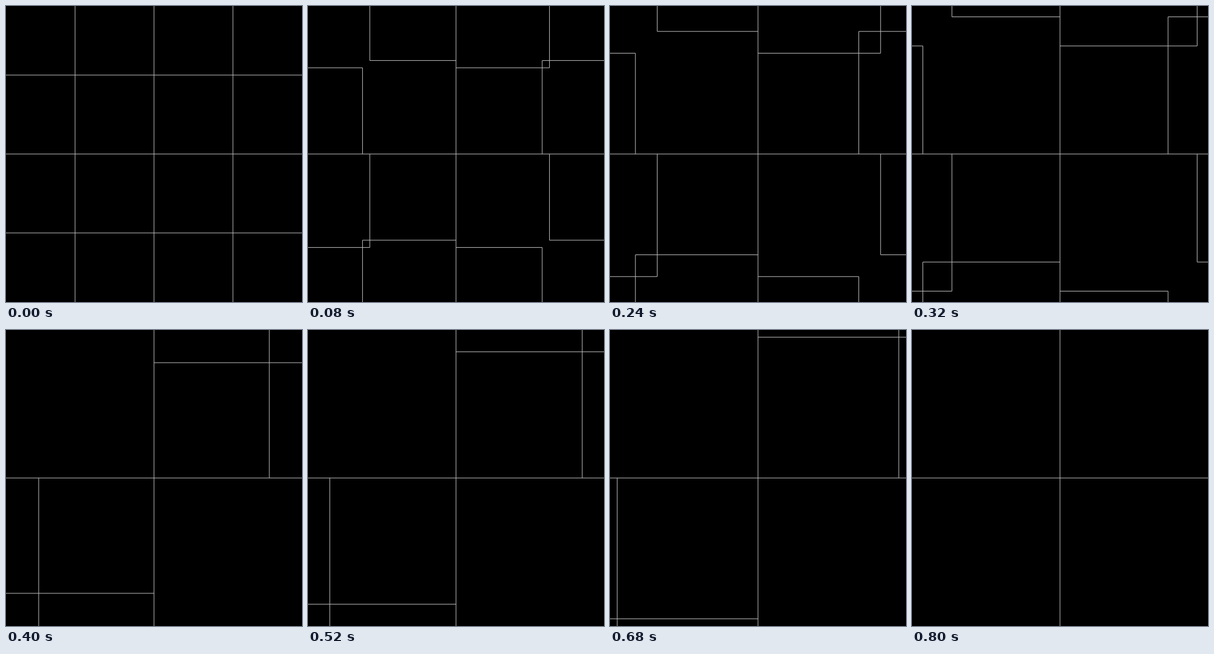
Animation of 480 by 480 pixels, one loop 960 ms. Source, as an HTML page without scripts:

```html
<!DOCTYPE html>
<html lang="en">
<head>
<meta charset="utf-8">
<title>Parting grid</title>
<style>
  @property --shift {
    syntax: "<number>";
    inherits: true;
    initial-value: 0;
  }

  html, body {
    margin: 0;
    height: 100%;
    overflow: hidden;
    background: #000;
  }

  .stage {
    display: block;
    width: 100%;
    height: 100%;
    fill: none;
    stroke: #bbb;
    animation: part 960ms infinite;
  }

  /* Each corner slides along both axes, one twice as fast as the other. */
  .corner {
    transform: translate(
      calc(var(--x) * var(--shift) * 1px),
      calc(var(--y) * var(--shift) * 1px));
  }

  @keyframes part {
    0% { --shift: 0; animation-timing-function: steps(20); }
    83.3%, 100% { --shift: 118; }
  }
</style>
</head>
<body>
<svg class="stage" viewBox="0 0 480 480">
  <defs>
    <g id="half">
      <svg width="240" height="240" viewBox="0 0 240 240">
        <path class="corner" style="--x:-1; --y:-2" d="M112 -400V112H640"/>
        <path class="corner" style="--x:-2; --y:-1" d="M-400 112H112V640"/>
      </svg>
      <svg x="240" width="240" height="240" viewBox="240 0 240 240">
        <path class="corner" style="--x:2; --y:-1" d="M368 -400V112H-160"/>
        <path class="corner" style="--x:1; --y:-2" d="M880 112H368V640"/>
      </svg>
    </g>
  </defs>
  <use href="#half"/>
  <use href="#half" transform="rotate(180 240 240)"/>
  <path d="M240 0V480M0 240H480"/>
</svg>
</body>
</html>
```
